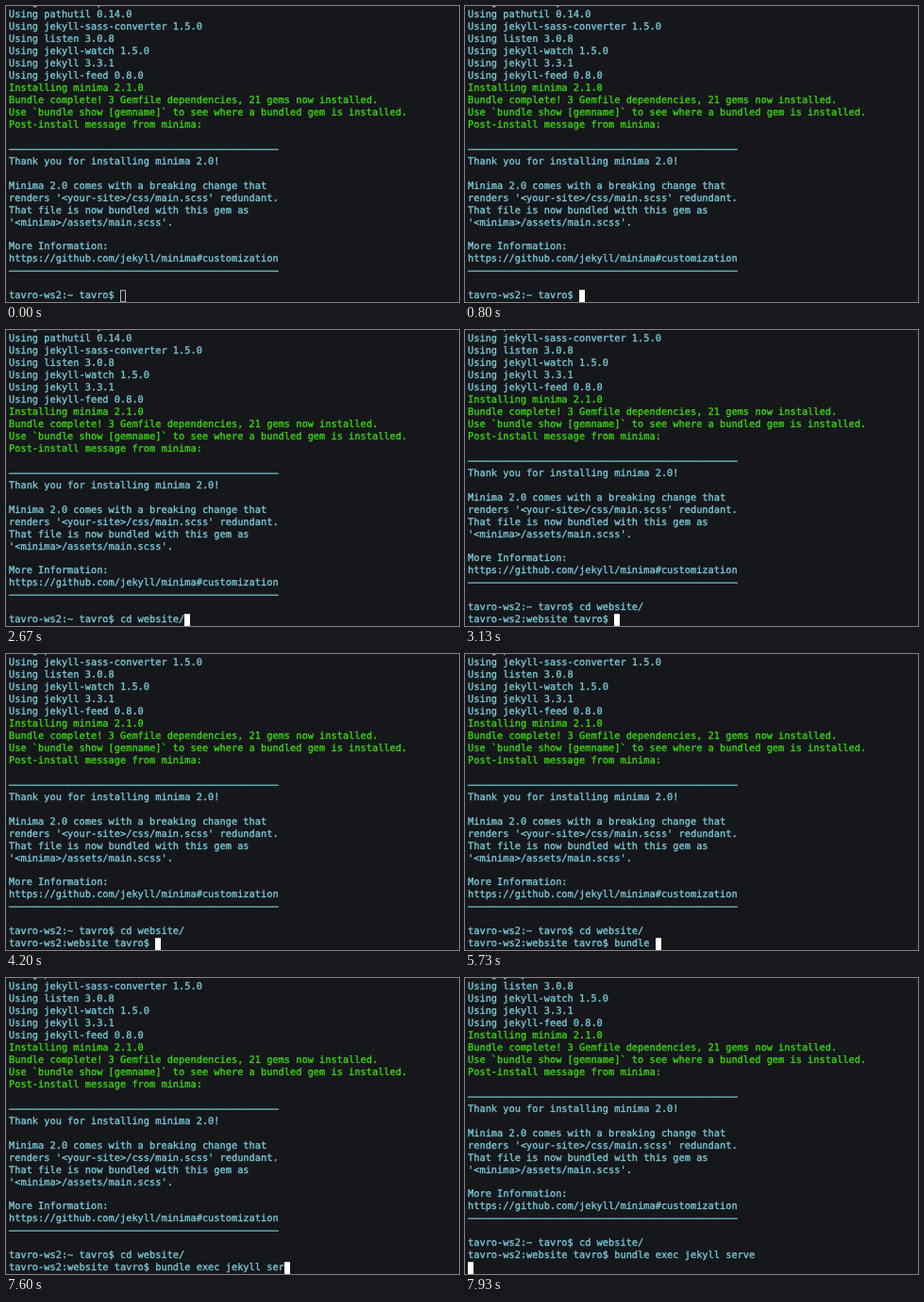
These frames come from a looping animation (480x314 px, 8000 ms). An HTML page:

```html
<!DOCTYPE html>
<html lang="en">
<head>
<meta charset="utf-8">
<title>Terminal</title>
<style>
  html, body { margin: 0; width: 100%; height: 100%; overflow: hidden; background: #15171b; }
  pre {
    position: absolute; left: 3px; top: 314.4px; margin: 0;
    transform: translateY(-100%);
    font: 10.327px/12.95px "DejaVu Sans Mono", monospace;
    text-rendering: geometricPrecision;
    font-variant-ligatures: none;
    -webkit-text-stroke: 0.32px;
    color: #7ccad8;
  }
  b { font-weight: normal; color: #3cd810; }
  i { display: inline-block; width: 6.2px; height: 12.95px; vertical-align: bottom; background: #fff; }
  i.idle { background: none; box-shadow: inset 0 0 0 1px #b4b8ba; }
</style>
</head>
<body>
<pre>Using rb-inotify 0.9.7
Using pathutil 0.14.0
Using jekyll-sass-converter 1.5.0
Using listen 3.0.8
Using jekyll-watch 1.5.0
Using jekyll 3.3.1
Using jekyll-feed 0.8.0
<b>Installing minima 2.1.0
Bundle complete! 3 Gemfile dependencies, 21 gems now installed.
Use `bundle show [gemname]` to see where a bundled gem is installed.
Post-install message from minima:</b>

––––––––––––––––––––––––––––––––––––––––––––––
Thank you for installing minima 2.0!

Minima 2.0 comes with a breaking change that
renders '&lt;your-site&gt;/css/main.scss' redundant.
That file is now bundled with this gem as
'&lt;minima&gt;/assets/main.scss'.

More Information:
https://github.com/jekyll/minima#customization
––––––––––––––––––––––––––––––––––––––––––––––

<span id="session"></span><i id="cursor"></i></pre>
<script>
  const LOOP = 8000, FOCUS = 450, INSTANT = 0.01;
  const prompt = dir => `tavro-ws2:${dir} tavro$ `;

  // [start ms, ms per character, text]
  const output = [
    [0, INSTANT, prompt('~')],
    [880, 140, 'cd webs'],
    [2070, INSTANT, 'ite/'],
    [2800, INSTANT, '\n' + prompt('website')],
    [4700, 150, 'bundle '],
    [5860, 150, 'exec je'],
    [6870, 92, 'kyll serve'],
    [7860, INSTANT, '\n'],
  ];

  const session = document.getElementById('session');
  const cursor = document.getElementById('cursor');

  function draw() {
    const t = performance.now() % LOOP;
    const text = output.map(([start, step, s]) =>
      t < start ? '' : s.slice(0, 1 + Math.floor((t - start) / step))).join('');
    if (session.textContent !== text) session.textContent = text;
    cursor.className = t < FOCUS ? 'idle' : '';
    requestAnimationFrame(draw);
  }
  draw();
</script>
</body>
</html>
```
